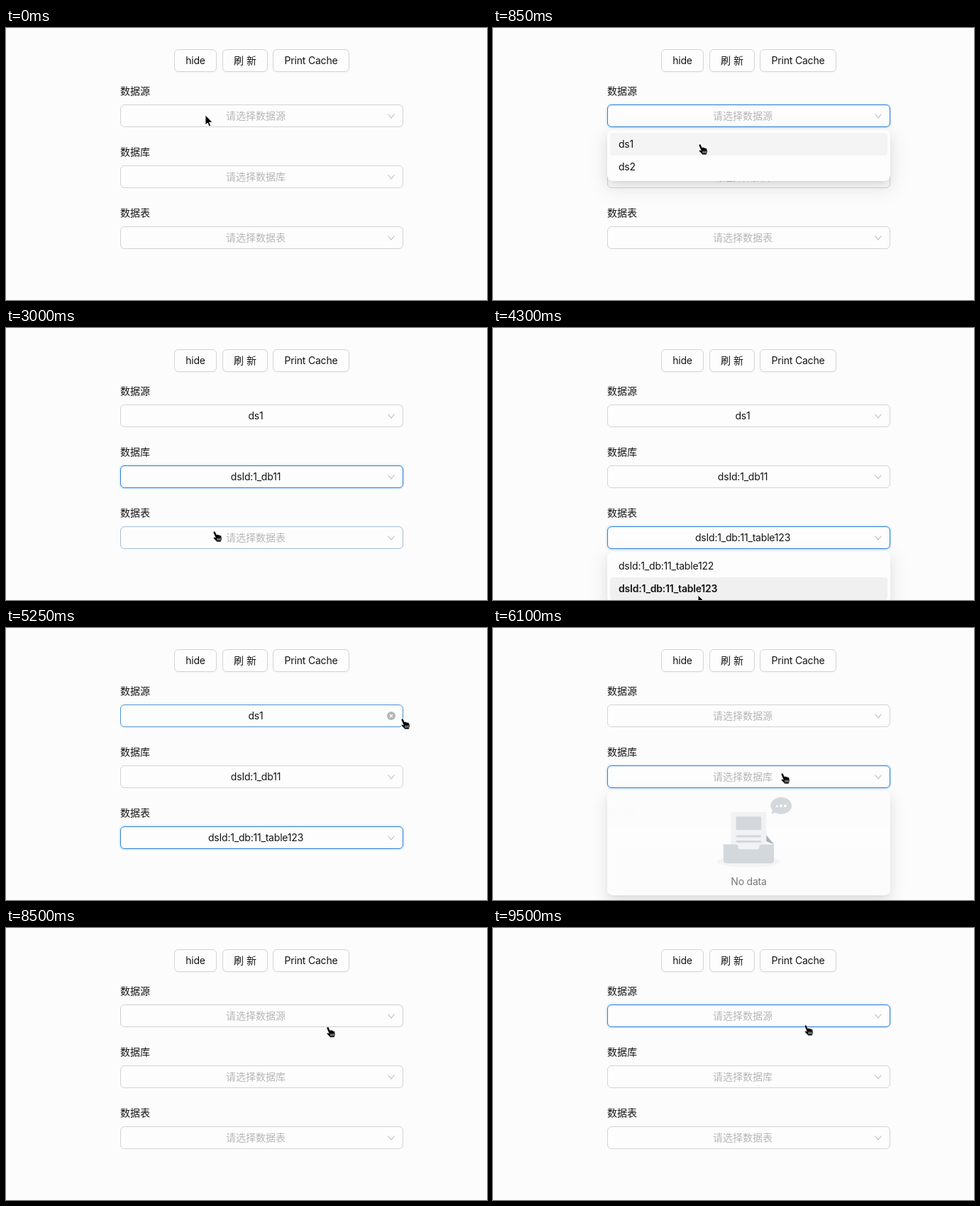
An HTML page for the animation above (9750 ms loop, 678x384 px).

```html
<!DOCTYPE html>
<html lang="zh-CN">
<head>
<meta charset="utf-8">
<style>
html, body { margin: 0; width: 100%; height: 100%; overflow: hidden; background: #fcfcfc; }
body { position: relative; font: 14px/22px Inter, "Noto Sans CJK SC", "Noto Sans CJK", sans-serif; color: #141414; }
div, svg { position: absolute; box-sizing: border-box; white-space: nowrap; }
.latin { letter-spacing: -.2px; }
.btn { top: 30px; height: 32px; line-height: 30px; text-align: center; border: 1px solid #d3d3d3; border-radius: 6px; background: #fdfdfd; box-shadow: 0 2px 0 rgba(0,0,0,.02); }
.label { left: 161px; }
.select { left: 161px; width: 399px; height: 32px; border: 1px solid; border-radius: 6px; background: #fdfdfd; }
.text { left: 10px; right: 27px; top: 4px; text-align: center; }
.select svg { left: 375px; top: 9px; }
.popup { left: 161px; width: 399px; border-radius: 8px; background: #fdfdfd; box-shadow: 0 6px 16px rgba(0,0,0,.08), 0 3px 6px -4px rgba(0,0,0,.12), 0 9px 28px 8px rgba(0,0,0,.05); }
.item { left: 4px; right: 4px; height: 32px; padding: 5px 12px; border-radius: 4px; }
.nodata { left: 0; right: 0; top: 117px; text-align: center; color: #777; }
</style>
</head>
<body>
<div class="btn latin" style="left:237px;width:60px">hide</div>
<div class="btn" style="left:305px;width:64px">刷 新</div>
<div class="btn latin" style="left:376px;width:108px">Print Cache</div>

<template id="empty">
  <svg style="left:139px;top:9px" width="121" height="100" viewBox="0 0 184 152">
    <g transform="translate(24 31.67)">
      <ellipse cx="67.8" cy="106.9" rx="67.8" ry="12.7" fill="#f4f4f5"/>
      <path fill="#a7b0b7" d="M122 69.7 98 40.2q-2-2.2-4.6-2.2H42q-2.600-4.500 2.200L13.500 69.700V85H122z"/>
      <rect x="29.8" width="76" height="101" rx="4" fill="#f1f2f4"/>
      <g fill="#d3d8dd">
        <rect x="40.700" y="10" width="54.200" height="29" rx="2"/>
        <rect x="40.700" y="49.800" width="54.200" height="4.500" rx="2.200"/>
        <rect x="40.700" y="61.500" width="54.200" height="4.500" rx="2.200"/>
        <path d="M13.500 69.700h26.400q5.200 0 5.200 5.400t5.300 5.400h34.800q5.300 0 5.300-5.400t5.200-5.400H122v33.500q0 7.200-7 7.200H20.500q-7 0-7-7.200z"/>
      </g>
    </g>
    <path fill="#d3d8dd" d="m149 33.300-6.800 2.600a1 1 0 0 1-1.300-1.200l2-6.200c-2.600-3-4.100-6.500-4.100-10.400C138.800 8 149 0 161.400 0S184 8 184 18s-10 18.100-22.600 18.100q-6.800 0-12.400-2.800z"/>
    <g fill="#fff"><path d="M155.400 21h-5.700l2.900-5zM158.900 16h5v5h-5z"/><circle cx="170.300" cy="18.500" r="2.800"/></g>
  </svg>
  <div class="nodata latin">No data</div>
</template>

<script>
const LOOP = 9750, CLEARED = 5500;
const fields = [
  { name: "数据源", y: 108, set: 1100, pick: 0, items: ["ds1", "ds2"], focus: [[340, 1840], [CLEARED, 5970], [8680, 1e5]] },
  { name: "数据库", y: 194, set: 2400, pick: 0, items: ["dsId:1_db11", "dsId:1_db12"], focus: [[1840, 3160], [5970, 7370]] },
  { name: "数据表", y: 280, set: 4060, pick: 1, items: ["dsId:1_db:11_table122", "dsId:1_db:11_table123"], focus: [[3160, CLEARED], [7370, 7920]] }
];
const popups = [
  { field: 0, open: 350, close: 1100 },
  { field: 1, open: 1850, close: 2400 },
  { field: 2, open: 3170, close: 4300 },
  { field: 1, open: 5985, close: 6420, empty: true },
  { field: 2, open: 7385, close: 7920, empty: true, up: true },
  { field: 0, open: 8700, close: 9290 }
];
// pointer stops: time, x, y
const stops = [
  [0, 281, 123], [150, 281, 123], [300, 284, 126], [550, 284, 126], [850, 292, 164], [1150, 292, 164],
  [1640, 296, 203], [1900, 296, 203], [2200, 294, 249], [2450, 294, 249], [2850, 294, 270], [3000, 294, 287],
  [3250, 294, 287], [3900, 289, 377], [4450, 289, 377], [5150, 559, 128], [5250, 559, 128], [5420, 542, 122],
  [5550, 542, 122], [5880, 408, 205], [6500, 408, 205], [7000, 386, 291], [7520, 386, 291], [7800, 618, 262],
  [8000, 618, 262], [8600, 441, 130], [8850, 441, 130], [9050, 441, 137], [LOOP, 441, 137]
];

const clamp = v => Math.max(0, Math.min(1, v));
const smooth = p => p * p * (3 - 2 * p);
const mix = (a, b, p) => a + (b - a) * p;
const blend = (a, b, p) => `rgb(${a.map((v, i) => Math.round(mix(v, b[i], p)))})`;

function add(parent, cls, html = "", style = "") {
  const el = document.createElement("div");
  el.className = cls;
  el.innerHTML = html;
  el.style.cssText = style;
  return parent.appendChild(el);
}

const chevron = '<path d="M1.500 3.500 6 9l4.500-5.500" fill="none" stroke="#b9b9b9" stroke-width="1.100"/>';
const clearIcon = '<circle cx="6" cy="6" r="6" fill="#b5b5b5"/><path d="m4 4 4 4m0-4-4 4" stroke="#fff" stroke-width="1.100"/>';

for (const f of fields) {
  add(document.body, "label", f.name, `top:${f.y - 30}px`);
  f.el = add(document.body, "select", "", `top:${f.y}px`);
  f.text = add(f.el, "text");
  f.el.insertAdjacentHTML("beforeend", `<svg width="12" height="12">${chevron}</svg><svg width="12" height="12">${clearIcon}</svg>`);
  [f.arrow, f.clear] = f.el.querySelectorAll("svg");
}
for (const p of popups) {
  const y = fields[p.field].y;
  p.height = p.empty ? 148 : 72;
  p.top = p.up ? y - 4 - p.height : y + 36;
  p.el = add(document.body, "popup", "", `top:${p.top}px;height:${p.height}px;transform-origin:${p.up ? "bottom" : "top"}`);
  if (p.empty) p.el.append(document.getElementById("empty").content.cloneNode(true));
  else p.rows = fields[p.field].items.map((s, i) => add(p.el, "item latin", s, `top:${4 + 32 * i}px`));
}
const pointer = add(document.body, "", `
  <svg width="14" height="20" style="left:-1px;top:-1px" viewBox="-1 -1 14 20">
    <path d="M0 0v14l3.200-3 2.100 5 2.400-1-2.100-4.800H10z" stroke="#fff" stroke-width=".9"/></svg>
  <svg width="16" height="19" style="left:-3px;top:-1px">
    <path d="M1.500 1.600C2.300.6 3.600.8 4.200 2L6 6l.3-.6c1-.6 2 0 2.200.8.9-.6 2-.1 2.200.8.9-.4 1.900.1 2 1.100.5 2.600.8 4.200-.2 6.200L12 16H6.200C5 14.200 3.200 13 1.800 11.300.6 9.900 2 8.800 3.400 9.600l.8.4-2.900-6.700Q.9 2.300 1.500 1.600z" stroke="#fff" stroke-width=".8"/>
    <path d="M7 10.500V14m2-3.500V14m2-3.500V14" stroke="#fff" stroke-width=".8"/></svg>`);
const [arrowSvg, handSvg] = pointer.children;

function pointerAt(t) {
  const i = Math.max(1, stops.findIndex(s => s[0] >= t));
  const [t0, x0, y0] = stops[i - 1], [t1, x1, y1] = stops[i];
  const p = smooth(clamp((t - t0) / (t1 - t0)));
  return [mix(x0, x1, p), mix(y0, y1, p)];
}
const over = (f, [x, y]) => x >= 161 && x <= 560 && y >= f.y && y <= f.y + 32;

// share of the last 200 ms spent over the field
function hoverOf(f, t) {
  let n = 0;
  for (let k = 0; k < 20; k++) {
    const s = t - k * 10;
    if (s > 120 && over(f, pointerAt(s))) n++;
  }
  return n / 20;
}

function draw(t) {
  const pos = pointerAt(t);
  let hand = false;

  for (const f of fields) {
    const filled = t >= f.set && t < CLEARED, inside = t > 120 && over(f, pos);
    const focus = Math.max(...f.focus.map(([a, b]) => clamp((t - a) / 100) - clamp((t - b) / 100)));
    const tint = Math.max(focus, hoverOf(f, t) * .8);
    f.el.style.borderColor = blend([211, 211, 211], [42, 126, 212], tint);
    f.el.style.boxShadow = `0 0 0 2px rgba(5,125,240,${.1 * focus})`;
    f.text.textContent = filled ? f.items[f.pick] : `请选择${f.name}`;
    f.text.classList.toggle("latin", filled);
    f.text.style.color = filled ? "" : "#b6b6b6";
    f.clear.style.opacity = +(filled && inside);
    f.arrow.style.opacity = +!(filled && inside);
    hand ||= inside;
  }

  for (const p of popups) {
    const show = 1 - (1 - clamp((t - p.open) / 200)) ** 5;
    const hide = clamp((t - p.close) / 200) ** 3;
    const k = show * (1 - hide);
    p.el.style.visibility = k > 0 ? "visible" : "hidden";
    if (k <= 0) continue;
    p.el.style.opacity = k;
    p.el.style.transform = `scaleY(${.8 + .2 * k})`;
    if (!p.rows) continue;
    const f = fields[p.field], row = Math.floor((pos[1] - p.top - 4) / 32);
    const inList = row >= 0 && row < p.rows.length;
    const filled = t >= f.set && t < CLEARED;
    p.rows.forEach((el, i) => {
      const chosen = filled && i === f.pick;
      el.style.fontWeight = chosen ? 600 : 400;
      el.style.background = chosen ? "#f0f0f0" : i === (inList ? row : 0) ? "#f4f4f4" : "none";
    });
    if (inList && t < (filled ? f.set : p.close)) hand = true;
  }

  pointer.style.transform = `translate(${pos[0]}px,${pos[1]}px)`;
  handSvg.style.opacity = +hand;
  arrowSvg.style.opacity = +!hand;
}

const start = performance.now();
function tick() {
  draw((performance.now() - start) % LOOP);
  requestAnimationFrame(tick);
}
tick();
</script>
</body>
</html>
```
